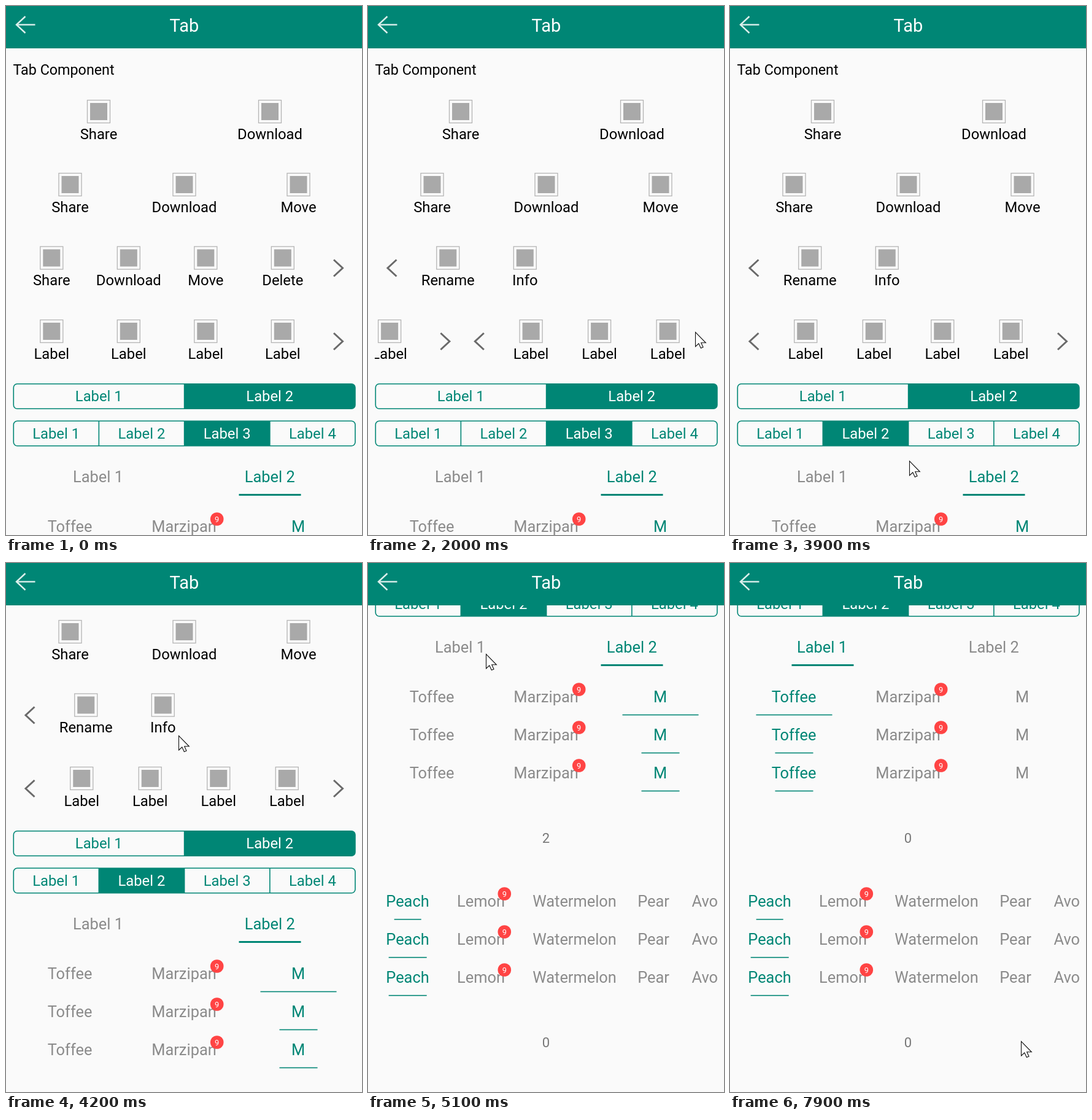
These frames come from a looping animation (580 px wide and 862 px high, 8 s). An HTML page with a canvas:

```html
<!DOCTYPE html>
<html lang="en">
<head>
<meta charset="utf-8">
<title>Tab</title>
<style>
  html, body { margin: 0; width: 100%; height: 100%; overflow: hidden; background: #fafafa; }
  canvas { display: block; }
</style>
</head>
<body>
<canvas id="stage" width="580" height="862"></canvas>
<script>
const ctx = document.getElementById('stage').getContext('2d');
const WIDTH = 580, HEIGHT = 862, LOOP = 8000, PAGE = 558;
const TEAL = '#008675', GREY = '#8b8b8b', RED = '#ff4444', PAPER = '#fafafa';

// Keyframes: [time, ...values], linear in between.
const CURSOR = [
  [100, 514, 238], [300, 529, 345], [500, 535, 429], [1200, 535, 429], [1300, 534, 453],
  [1500, 533, 531], [2000, 533, 531], [2400, 457, 686], [2500, 453, 691], [2700, 455, 699],
  [2900, 455, 699], [3300, 171, 706], [3500, 171, 706], [3700, 270, 750], [3900, 292, 741],
  [4000, 290, 690], [4200, 281, 281], [4300, 280, 180], [4700, 280, 180], [5100, 192, 148],
  [5400, 192, 148], [5800, 280, 306], [6100, 280, 300], [6400, 130, 285], [6700, 130, 285],
  [7400, 400, 487], [7900, 474, 779]
];
const SCROLL = [
  [4000, 0], [4100, 50], [4200, 179], [4300, 340], [4400, 470], [4500, 560], [4600, 612], [4700, 630]
];

function track(keys, time) {
  const next = keys.findIndex(key => key[0] > time);
  if (next < 0) return keys[keys.length - 1].slice(1);
  if (next === 0) return keys[0].slice(1);
  const a = keys[next - 1], b = keys[next];
  const k = (time - a[0]) / (b[0] - a[0]);
  return a.slice(1).map((v, i) => v + (b[i + 1] - v) * k);
}

// Quintic ease-out from 0 to 1, as a pager settles.
function settle(time, start, duration) {
  const k = Math.min(1, Math.max(0, (time - start) / duration));
  return 1 - (1 - k) ** 5;
}

function text(str, x, y, size, color, align = 'center') {
  ctx.font = `${size}px Roboto, sans-serif`;
  ctx.textAlign = align;
  ctx.fillStyle = color;
  ctx.fillText(str, x, y);
}

function polyline(points, color, width) {
  ctx.beginPath();
  points.forEach(([x, y]) => ctx.lineTo(x, y));
  ctx.strokeStyle = color;
  ctx.lineWidth = width;
  ctx.stroke();
}

function underline(x, y, width, thickness) {
  ctx.fillStyle = TEAL;
  ctx.fillRect(x - width / 2, y - thickness / 2, width, thickness);
}

function clipped(x, y, w, h, draw) {
  ctx.save();
  ctx.beginPath();
  ctx.rect(x, y, w, h);
  ctx.clip();
  draw();
  ctx.restore();
}

function iconItem(label, x, top) {
  ctx.strokeStyle = '#b4b4b4';
  ctx.lineWidth = 1.3;
  ctx.strokeRect(x - 18.5, top + .5, 37, 37);
  ctx.fillStyle = '#a9a9a9';
  ctx.fillRect(x - 14, top + 5, 28, 28);
  text(label, x, top + 63.5, 23.8, '#000');
}

function chevron(x, y, dir) {
  polyline([[x - 7 * dir, y - 13.5], [x + 7.5 * dir, y], [x - 7 * dir, y + 13.5]], '#6a6a6a', 3);
}

function iconPager(top, progress, first, second, spacing, hasMore) {
  clipped(11, top - 5, PAGE + 1, 80, () => {
    const left = 11.5 - PAGE * progress;
    first.forEach((label, i) => iconItem(label, left + 62.8 + 125.5 * i, top));
    chevron(left + 529.5, top + 35.5, 1);
    const right = left + PAGE;
    chevron(right + 28, top + 35.5, -1);
    second.forEach((label, i) => iconItem(label, right + 56 + spacing * (i + .5), top));
    if (hasMore) chevron(right + 529.5, top + 35.5, 1);
  });
}

function segments(top, count, selected) {
  const width = 557 / count;
  ctx.beginPath();
  ctx.roundRect(12.3, top, 556.6, 40.5, 6);
  ctx.save();
  ctx.clip();
  ctx.fillStyle = TEAL;
  ctx.fillRect(12 + width * selected, top, width, 41);
  for (let i = 1; i < count; i++) ctx.fillRect(11.3 + width * i, top, 1.6, 41);
  ctx.restore();
  ctx.strokeStyle = TEAL;
  ctx.lineWidth = 1.6;
  ctx.stroke();
  for (let i = 0; i < count; i++)
    text(`Label ${i + 1}`, 12 + width * (i + .5), top + 28.5, 23.8, i === selected ? '#fff' : TEAL);
}

function badge(x, y) {
  ctx.beginPath();
  ctx.arc(x, y, 10.8, 0, 7);
  ctx.fillStyle = RED;
  ctx.fill();
  text('9', x, y + 4.6, 12.8, '#fff');
}

function tab(label, x, y, active, align) {
  text(label, x, y, 25.4, active ? TEAL : GREY, align);
}

function labelTabs(time) {
  const selected = time < 5300 ? 1 : 0;
  [150, 429.7].forEach((x, i) => tab(`Label ${i + 1}`, x, 776, i === selected));
  underline(430 - 279 * settle(time, 5230, 500), 796.5, 101, 3);
}

function dessertTabs(time) {
  const page = 2 - settle(time, 5915, 650) - settle(time, 6510, 650);
  const selected = time < 6000 ? 2 : time < 6600 ? 1 : 0;
  for (let row = 0; row < 3; row++) {
    const y = 857 + 62 * row;
    ['Toffee', 'Marzipan', 'M'].forEach((label, i) => tab(label, 104 + 186 * i, y, i === selected));
    badge(343.7, y - 21);
    underline(104.5 + 186 * page, y + 20.5, row ? 62 : 124, 1.6);
  }
  for (let i = 0; i < 3; i++) text(i, 290 + PAGE * (i - page), 1085.5, 22, '#777');
}

function fruitTabs() {
  clipped(11, 1150, 559, 220, () => {
    for (let row = 0; row < 3; row++) {
      const y = 1190 + 62 * row;
      tab('Peach', 64.5, y, true);
      tab('Lemon', 184, y);
      tab('Watermelon', 336.5, y);
      tab('Pear', 465, y);
      tab('Avocado', 527.5, y, false, 'left');
      badge(222.3, y - 21);
      underline(64.7, y + 20.7, row ? 62 : 44, 1.6);
    }
  });
  text('0', 290, 1418.5, 22, '#777');
}

function header() {
  ctx.fillStyle = TEAL;
  ctx.fillRect(0, 0, WIDTH, 69);
  text('Tab', 290.5, 42, 29, '#fff');
  polyline([[17, 30.5], [47.5, 30.5]], '#dcefec', 2.4);
  polyline([[31.5, 17], [17, 30.5], [31.5, 44]], '#dcefec', 2.4);
}

function cursor(x, y) {
  ctx.save();
  ctx.translate(x + .5, y + .5);
  ctx.beginPath();
  [[0, 0], [0, 23.5], [5.3, 18.5], [8.8, 26], [12.5, 24.5], [9.2, 17.3], [16.8, 17.3]]
    .forEach(([px, py]) => ctx.lineTo(px, py));
  ctx.closePath();
  ctx.fillStyle = '#fff';
  ctx.fill();
  ctx.strokeStyle = '#111';
  ctx.lineWidth = 1.1;
  ctx.stroke();
  ctx.restore();
}

function draw(time) {
  ctx.fillStyle = PAPER;
  ctx.fillRect(0, 0, WIDTH, HEIGHT);
  ctx.save();
  ctx.translate(0, -track(SCROLL, time)[0]);

  text('Tab Component', 11.5, 112, 23.3, '#000', 'left');
  ['Share', 'Download'].forEach((label, i) => iconItem(label, 151 + 279 * i, 153));
  ['Share', 'Download', 'Move'].forEach((label, i) => iconItem(label, 104.5 + 186 * i, 272));
  const labels = Array(4).fill('Label');
  iconPager(391.5, settle(time, 629, 1100), ['Share', 'Download', 'Move', 'Delete'], ['Rename', 'Info'], 125.5, false);
  iconPager(511, settle(time, 1737, 1100), labels, labels, 111.5, true);

  segments(615.8, 2, 1);
  segments(676.2, 4, time < 2900 ? 2 : time < 3500 ? 3 : 1);
  labelTabs(time);
  dessertTabs(time);
  fruitTabs();
  ctx.restore();

  header();
  if (time >= 100) cursor(...track(CURSOR, time));
}

function play(now) {
  draw(Math.floor(now % LOOP / 100) * 100);
  requestAnimationFrame(play);
}
requestAnimationFrame(play);
</script>
</body>
</html>
```
